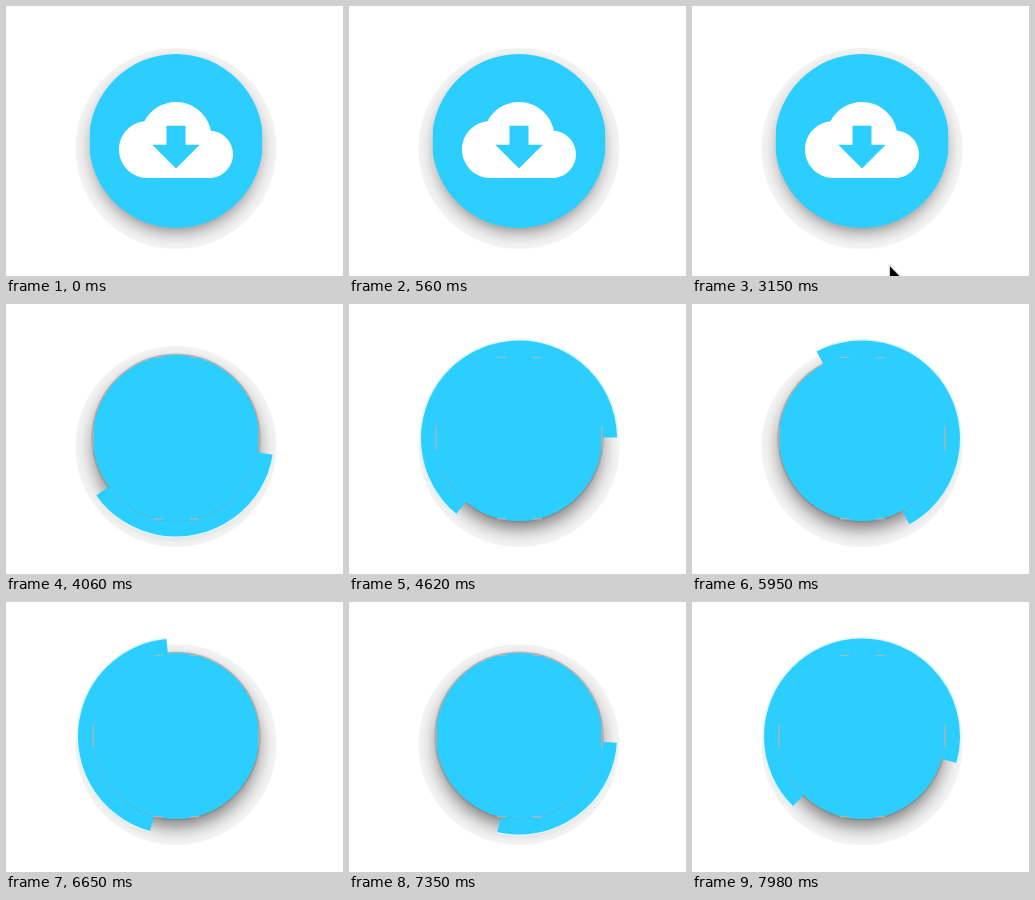
These frames come from a looping animation (337x270 px, 8000 ms). An HTML page with a canvas:

```html
<!DOCTYPE html>
<html lang="en">
<head>
<meta charset="utf-8">
<title>Download button</title>
<style>
  html, body { margin: 0; width: 100%; height: 100%; overflow: hidden; background: #fff; }
  canvas { display: block; width: 337px; height: 270px; }
</style>
</head>
<body>
<canvas id="stage" width="337" height="270"></canvas>
<script>
const ctx = document.getElementById('stage').getContext('2d');
const LOOP = 8000, STEP = 70, CX = 170;
const CYAN = '#2ccdff';
const CURSOR_IN = 3150, CURSOR_OUT = 3850, PRESS = 3780, SPIN = 3916;

// Each turn of the spinner: start time and tail angle in degrees
const TURNS = [[3916, -2], [5159, 415], [6470, 811], [7645, 1188], [8890, 1600]];
const GROW = 620, MIN_SWEEP = 20, MAX_SWEEP = 300, DRIFT = 0.08;

const cloud = new Path2D('M19.35 10.04C18.67 6.59 15.64 4 12 4 9.11 4 6.6 5.64 5.35 8.04 ' +
  '2.34 8.36 0 10.91 0 14c0 3.31 2.69 6 6 6h13c2.76 0 5-2.24 5-5 0-2.64-2.05-4.78-4.65-4.96z' +
  'M17 13l-5 5-5-5h3V9h4v4h3z');
const pointer = new Path2D('M0 0V25L5.5 19.5L9.5 28.5L13.5 26.8L9.6 18H17.5Z');

const clamp = v => Math.max(0, Math.min(1, v));
const mix = (a, b, p) => a + (b - a) * p;
const rad = deg => deg * Math.PI / 180;
const easeOut = p => 1 - (1 - p) ** 2;
const easeInOut = p => p * p * (3 - 2 * p);

const shade = ctx.createRadialGradient(CX, 142.5, 76, CX, 142.5, 101);
[[0, '#989898'], [0.2, '#b2b2b2'], [0.45, '#d4d4d4'], [0.65, '#e6e6e6'],
 [0.8, '#efefef'], [0.96, '#f3f3f3'], [1, '#ffffff']].forEach(([p, c]) => shade.addColorStop(p, c));

function disc(x, y, r, fill) {
  ctx.fillStyle = fill;
  ctx.beginPath();
  ctx.arc(x, y, r, 0, 2 * Math.PI);
  ctx.fill();
}

function drawButton(p) {
  const r = mix(87, 83, p), y = mix(135, 134, p), half = r - 0.8;
  disc(CX, 142.5, 101, shade);
  if (p > 0) {
    ctx.globalAlpha = p;
    disc(CX, y, r + 1.6, 'rgba(125,125,125,0.45)');
    ctx.globalAlpha = 1;
  }
  // The sides of the disc are cut slightly flat
  ctx.save();
  ctx.beginPath();
  ctx.rect(CX - half, 0, 2 * half, 270);
  ctx.clip();
  disc(CX, y, r, CYAN);
  ctx.restore();
}

function drawCloud(alpha) {
  ctx.save();
  ctx.globalAlpha = alpha;
  ctx.translate(113, 77);
  ctx.scale(4.75, 4.75);
  ctx.fillStyle = '#fff';
  ctx.fill(cloud);
  ctx.restore();
}

function spinnerPose(t) {
  let i = 0;
  while (t >= TURNS[i + 1][0]) i++;
  const [start, tail] = TURNS[i], [end, nextTail] = TURNS[i + 1];
  const age = t - start;
  if (age < GROW) {
    return [tail + DRIFT * age, mix(MIN_SWEEP, MAX_SWEEP, easeOut(age / GROW))];
  }
  const p = (age - GROW) / (end - start - GROW);
  const sweep = mix(MAX_SWEEP, MIN_SWEEP, easeOut(p));
  const head = mix(tail + DRIFT * GROW + MAX_SWEEP, nextTail + MIN_SWEEP, p);
  return [head - sweep, sweep];
}

function strokeArc(r, width, color, from, to) {
  ctx.strokeStyle = color;
  ctx.lineWidth = width;
  ctx.beginPath();
  ctx.arc(CX, 134.5, r, rad(from), rad(to));
  ctx.stroke();
}

function drawSpinner(t) {
  const [tail, sweep] = spinnerPose(t), head = tail + sweep;
  strokeArc(98.5, 2, '#dcf6fe', tail, head);
  strokeArc(90.4, 15.2, CYAN, tail, head);
  // Broken seam between ring and disc
  ctx.setLineDash([2, 9]);
  strokeArc(82.7, 0.8, 'rgba(150,195,205,0.6)', tail, head);
  ctx.setLineDash([]);
  ctx.fillStyle = '#a9b6b8';
  for (const x of [148, 184]) {
    ctx.fillRect(x, 214, 9, 1.5);
    ctx.fillRect(x, 53, 9, 1);
  }
  ctx.fillRect(86.5, 122, 1.3, 24);
  ctx.fillRect(252.3, 122, 1.3, 24);
}

function drawCursor(t) {
  const p = easeInOut(clamp((t - CURSOR_IN) / 420));
  ctx.save();
  ctx.translate(mix(198, 184, p), mix(260.5, 188, p));
  ctx.lineWidth = 2.4;
  ctx.strokeStyle = '#d5d5d5';
  ctx.stroke(pointer);
  ctx.fillStyle = '#000';
  ctx.fill(pointer);
  ctx.restore();
}

function draw(t) {
  ctx.fillStyle = '#fff';
  ctx.fillRect(0, 0, 337, 270);
  const press = clamp((t - PRESS) / 140);
  drawButton(press);
  if (press < 1) drawCloud(1 - press);
  if (t >= SPIN) drawSpinner(t);
  if (t >= CURSOR_IN && t < CURSOR_OUT) drawCursor(t);
}

const began = performance.now();
function tick() {
  const t = (performance.now() - began) % LOOP;
  draw(Math.floor(t / STEP) * STEP);
  requestAnimationFrame(tick);
}
tick();
</script>
</body>
</html>
```
